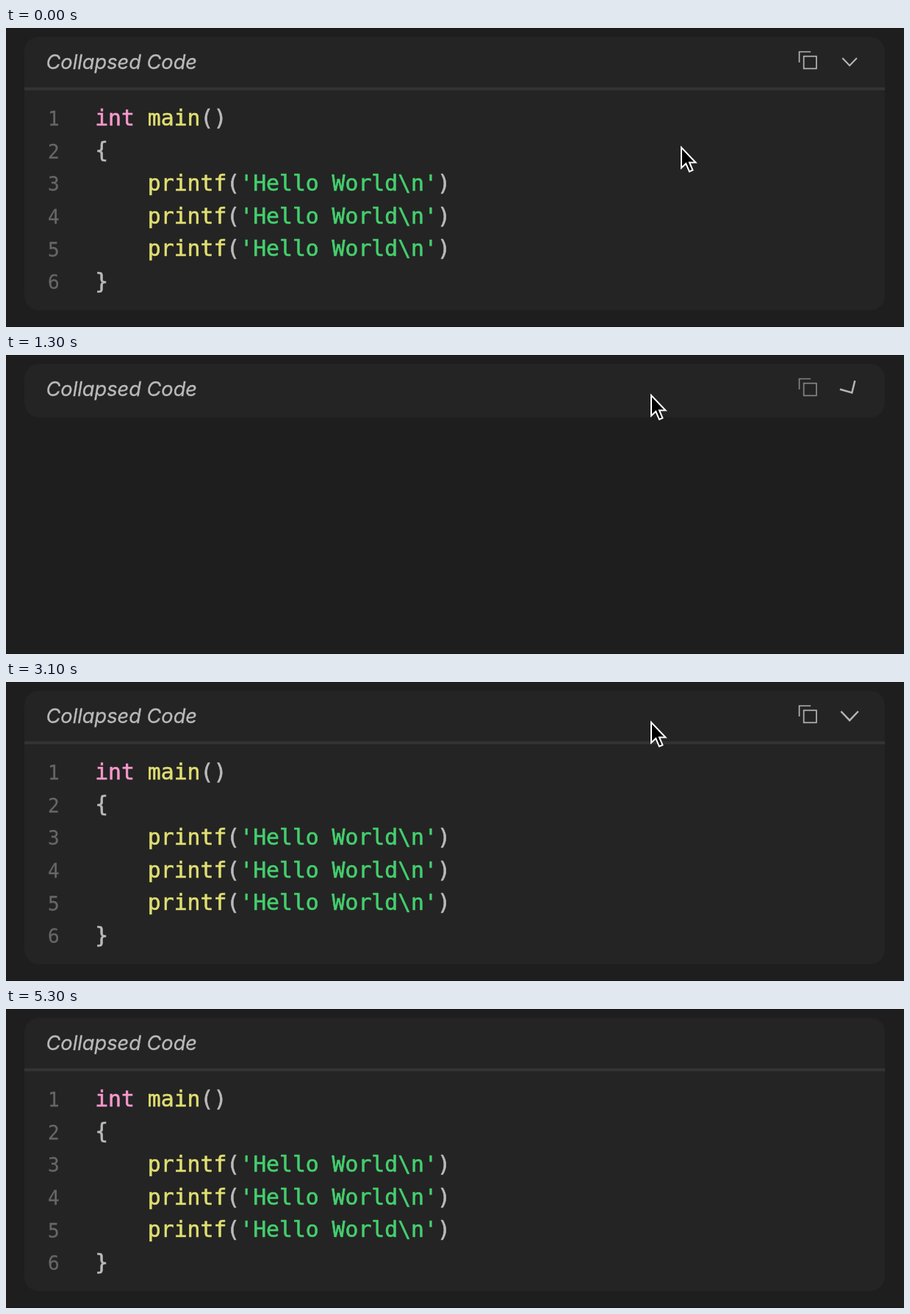
An HTML page that plays this animation: 1222 px wide and 408 px high, repeating every 5.8 s.

```html
<!DOCTYPE html>
<html lang="en">
<head>
<meta charset="utf-8">
<title>Collapsed Code</title>
<style>
  html, body { margin: 0; width: 100%; height: 100%; overflow: hidden; background: #1e1e1e; }
  svg { display: block; width: 1222px; height: 408px; }
  text { color: #bababa; white-space: pre; }
  text, tspan { fill: currentColor; stroke: currentColor; }
  #title { font: italic 27.2px Inter, sans-serif; stroke-width: 0.3; }
  #code text { font: 29.75px "DejaVu Sans Mono", monospace; stroke-width: 0.6; }
  #code .num { font-size: 26px; color: #666; stroke-width: 0.3; }
  .type { color: #fa99cd; }
  .call { color: #e0de71; }
  .str { color: #44cf6e; }
  .icon { fill: none; stroke: #b5b5b5; }
</style>
</head>
<body>
<svg viewBox="0 0 1222 408">
  <path d="M0 .5H1222M0 407.5H1222" stroke="#161616"/>
  <rect id="block" x="25" y="12" width="1171" height="373" rx="20" fill="#242424"/>
  <text id="title" x="54.5" y="56">Collapsed Code</text>
  <g id="code"><rect x="25" y="81" width="1171" height="4" fill="#333"/></g>
  <g id="copy" class="icon" stroke-width="1.7">
    <path d="M1079.5 47V32.5H1095"/>
    <rect x="1085.6" y="38.6" width="17.2" height="16.8"/>
  </g>
  <path id="chevron" class="icon" stroke-width="2.1" d="M-9.8 -5L0 5.3L9.8 -5"/>
  <path id="cursor" d="M1 1V29L7.3 23L12 34L16.5 32L12 21.5H20.5Z" stroke="#fff" stroke-width="2"/>
</svg>
<script>
const LOOP = 5800, STEP = 100;
const $ = id => document.getElementById(id);
const ramp = (t, a, b) => Math.min(1, Math.max(0, (t - a) / (b - a)));
const mix = (a, b, p) => a + (b - a) * p;
const span = (cls, s) => `<tspan class="${cls}">${s}</tspan>`;

const print = '    ' + span('call', 'printf') + '(' + span('str', "'Hello World\\n'") + ')';
const lines = [span('type', 'int') + ' ' + span('call', 'main') + '()', '{', print, print, print, '}'];
$('code').innerHTML += lines.map((line, i) => {
  const y = 132.7 + i * 44.625;
  return `<text class="num" x="57" y="${y + 0.5}">${i + 1}</text><text x="121.2" y="${y}">${line}</text>`;
}).join('');

function cursorAt(t) {
  if (t < 4900) {
    const p = 1 - (1 - ramp(t, 0, 900)) ** 2.2;
    return [mix(918, 877, p), mix(162, 54, p)];
  }
  // speeds up on the way out through the bottom
  const k = (t - 4800) / 100;
  return [877 - 6 * k ** 1.8, 54 + 7 * k ** 3];
}

function draw(t) {
  const folded = t >= 1300 && t < 2600;
  const fold = ramp(t, 1200, 1500) - ramp(t, 2500, 2800);
  const hover = ramp(t, 450, 800) - ramp(t, 4900, 5200);
  const leave = ramp(t, 5100, 5300);

  $('block').setAttribute('height', folded ? 73 : 373);
  $('code').style.display = folded ? 'none' : '';
  $('copy').setAttribute('opacity', (1 - fold) * (1 - leave));

  const scale = 1 + 0.2 * hover;
  $('chevron').setAttribute('transform', `translate(1148 46) rotate(${-90 * fold}) scale(${scale})`);
  $('chevron').setAttribute('opacity', 1 - leave);

  $('cursor').setAttribute('transform', `translate(${cursorAt(t)})`);
  $('cursor').style.display = t < 5200 ? '' : 'none';
}

const start = performance.now();
function tick() {
  const t = (performance.now() - start) % LOOP;
  draw(Math.floor(t / STEP) * STEP);
  requestAnimationFrame(tick);
}
tick();
</script>
</body>
</html>
```
